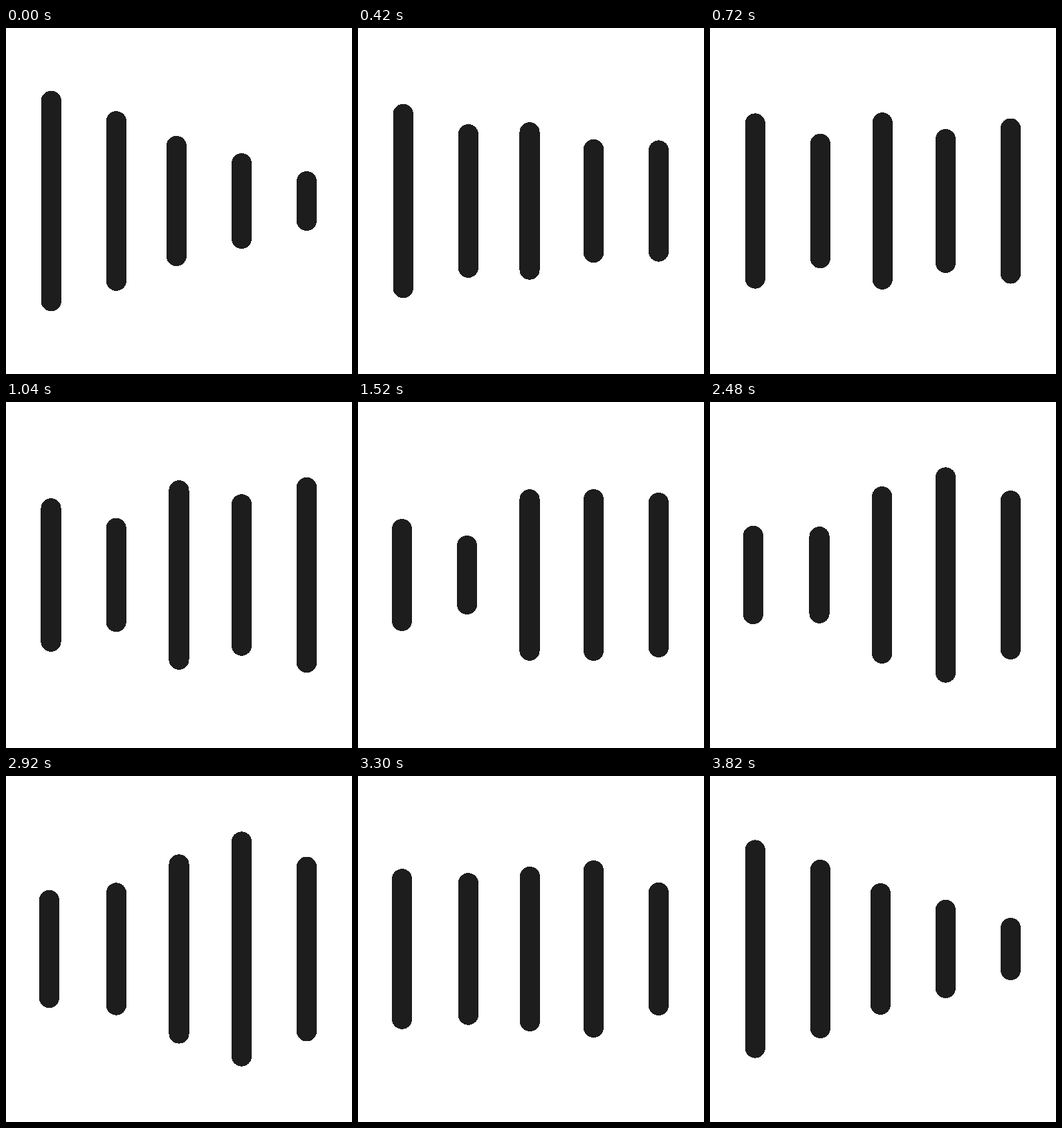
An HTML page that plays this animation: 500x500 px, repeating every 3.84 s.

```html
<!DOCTYPE html>
<html lang="en">
<head>
<meta charset="utf-8">
<title>Sound bars</title>
<style>
  html, body { margin: 0; width: 100%; height: 100%; overflow: hidden; background: #fff; }
  svg { display: block; width: 100%; height: 100%; }
</style>
</head>
<body>
<svg viewBox="0 0 500 500" fill="#1d1d1d" shape-rendering="crispEdges"></svg>
<script>
  const LOOP = 3840, STEP = 20, WIDTH = 29.2, MIDDLE = 250;

  // Centre x and top y at each quarter of the loop; linear in between.
  const bars = [
    { x: [65.25, 65.25, 62.3, 62.3], top: [90.8, 134.2, 194, 168] },
    { x: [159.4, 159.4, 156.2, 159.4], top: [120.2, 163.5, 214, 155.8] },
    { x: [246.25, 250.25, 246.4, 250.2], top: [155.9, 111, 137, 111.5] },
    { x: [340.5], top: [181.1, 134.5, 120, 76] },
    { x: [434.5], top: [207, 105, 149.5, 112.6] }
  ];

  const svg = document.querySelector('svg');
  for (const bar of bars) {
    bar.rect = document.createElementNS('http://www.w3.org/2000/svg', 'rect');
    bar.rect.setAttribute('width', WIDTH);
    bar.rect.setAttribute('rx', WIDTH / 2);
    svg.append(bar.rect);
  }

  function valueAt(keys, progress) {
    const position = progress * keys.length;
    const index = Math.floor(position);
    const from = keys[index];
    const to = keys[(index + 1) % keys.length];
    return from + (to - from) * (position - index);
  }

  function draw(time) {
    const progress = Math.floor((time % LOOP) / STEP) * STEP / LOOP;
    for (const { rect, x, top } of bars) {
      const y = valueAt(top, progress);
      rect.setAttribute('x', valueAt(x, progress) - WIDTH / 2);
      rect.setAttribute('y', y);
      rect.setAttribute('height', 2 * (MIDDLE - y));
    }
  }

  const start = performance.now();
  function tick() {
    draw(performance.now() - start);
    requestAnimationFrame(tick);
  }
  tick();
</script>
</body>
</html>
```
